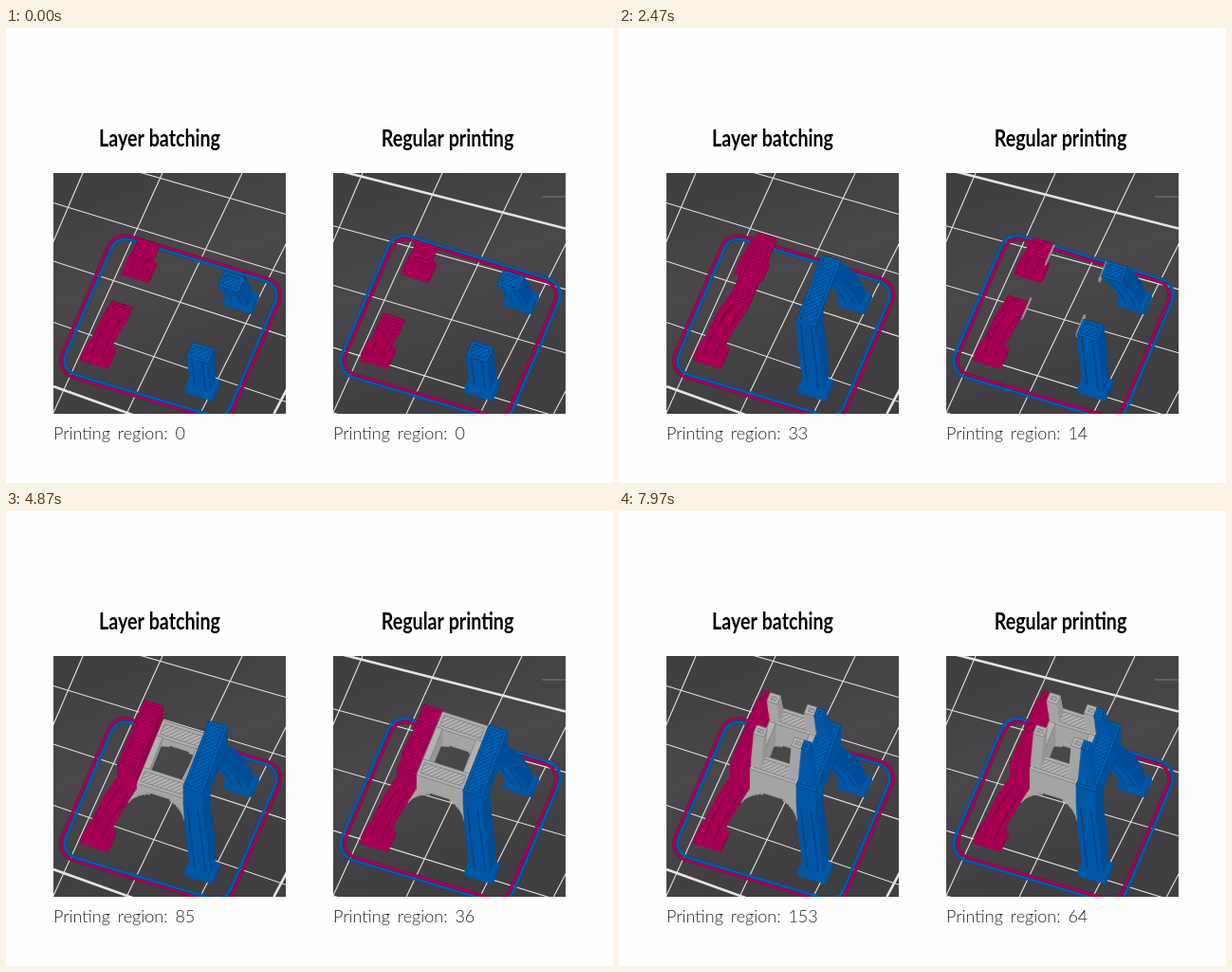
Write an HTML page with a canvas that moves like this. It is 640 px wide and 480 px high and loops after 8000 ms.

```html
<!DOCTYPE html>
<html lang="en">
<head>
<meta charset="utf-8">
<title>Layer batching and regular printing</title>
<style>
html, body { margin: 0; width: 100%; height: 100%; overflow: hidden; background: #fefefe; }
canvas { display: block; }
</style>
</head>
<body>
<canvas id="stage" width="640" height="480"></canvas>
<script>
const ctx = document.getElementById('stage').getContext('2d');
const LOOP = 8000, START = 970, STEP = 0.02, DECK = 1.27, PEAK = 1.61;
const BOX = [50, 153, 245, 254];

// top, front and right shade, infill line
const RED = ['#ae0059', '#a60053', '#8f0048', '#870045'];
const BLUE = ['#005fb0', '#0058a6', '#004c93', '#004384'];
const GRAY = ['#b2b2b2', '#a5a5a5', '#8d8d8d', '#7c7c7c'];

// outer corners: front left, front right, back right, back left
const BASE = [[78, 351], [218, 394], [267, 285], [130, 243]];
const ROOF = [[117, 340], [207, 369], [234, 299], [146, 271]];
const SKIRT = [[50, 363], [234, 418], [297, 270], [114, 214]];

const panels = [
  { shift: 0, title: 'Layer batching', mid: 162, rate: 0.02185, rings: [RED, BLUE],
    phase: 0, tilt: 0.36, boldAcross: 0, boldAlong: 4, heights: batched },
  { shift: 295, title: 'Regular printing', mid: 465.5, rate: 0.00912, rings: [BLUE, RED],
    phase: -0.4, tilt: 0.32, boldAcross: 4, boldAlong: -1, heights: regular }
];

const mix = (a, b, k) => a + (b - a) * k;
const mix2 = (a, b, k) => [mix(a[0], b[0], k), mix(a[1], b[1], k)];
const clamp = k => Math.max(0, Math.min(1, k));
const ramp = (x, a, b) => clamp((x - a) / (b - a));

// every material rises together
function regular(t) {
  const z = mix(0.55, PEAK, ramp(t, START, 7970) ** 0.85);
  return [z, z, z];
}

// in each batch the coloured sides rise first, then the middle catches up
function batched(t) {
  const ends = [START, 3900, 5900, 7900], levels = [0, 1.08, 1.3, PEAK];
  const rise = (first, from, to) => ends.slice(1).reduce((z, end, i) =>
    mix(z, levels[i + 1], ramp(ramp(t, ends[i], end), from, to)), first);
  return [rise(0.76, 0, 0.6), rise(0.8, 0.55, 0.9), rise(0.54, 0, 0.6)];
}

// u runs left to right, v front to back, both -1..1 on the tapering outline
function project(u, v, z) {
  const w = Math.min(z, 1) ** 1.6, k = (u + 1) / 2;
  const c = BASE.map((b, i) => mix2(b, ROOF[i], w));
  const [x, y] = mix2(mix2(c[0], c[1], k), mix2(c[3], c[2], k), (v + 1) / 2);
  return [x, y - 52 * Math.min(z, 1) - 75 * Math.max(0, z - 1)];
}

function trace(points, close = true) {
  ctx.beginPath();
  points.forEach(q => ctx.lineTo(...q));
  if (close) ctx.closePath();
}

function fill(points, color) {
  trace(points);
  ctx.fillStyle = color;
  ctx.fill();
}

function infill([a, b, c, d], color) {
  const at = (i, j) => mix2(mix2(a, b, i), mix2(d, c, i), j);
  const w = Math.hypot(b[0] - a[0], b[1] - a[1]), h = Math.hypot(d[0] - a[0], d[1] - a[1]);
  ctx.strokeStyle = color;
  ctx.lineWidth = 0.8;
  trace([a, b, c, d]);
  ctx.stroke();
  if (Math.min(w, h) < 8) return;
  const mx = 3 / w, my = 3 / h;
  trace([at(mx, my), at(1 - mx, my), at(1 - mx, 1 - my), at(mx, 1 - my)]);
  ctx.stroke();
  ctx.save();
  ctx.clip();
  ctx.beginPath();
  for (let s = -h; s < w; s += 5) {
    ctx.moveTo(...at(s / w, 0));
    ctx.lineTo(...at((s + h) / w, 1));
  }
  ctx.stroke();
  ctx.restore();
}

function slab([u0, u1, v0, v1], z, color, open) {
  const ring = h => [[u0, v0], [u1, v0], [u1, v1], [u0, v1]].map(q => project(...q, h));
  const low = ring(z), high = ring(z + STEP);
  const front = (a, b, shade) => fill([mix2(low[0], low[1], a), mix2(low[0], low[1], b),
    mix2(high[0], high[1], b), mix2(high[0], high[1], a)], shade);
  front(0, 1, color[1]);
  fill([low[1], low[2], high[2], high[1]], color[2]);
  fill(high, open ? color[0] : color[1]);
  if (open) infill(high, color[3]);
  // recessed panel along the legs
  if (color !== GRAY && z > 0.1 && z < 1) {
    front(0.2, 0.28, color[3]);
    front(0.72, 0.8, color[3]);
  }
}

// opening between the legs, 1 at the spring and 0 at the crown
const arch = (z, spring, n) => (1 - ramp(z, spring, 1) ** n) ** (1 / n);

function pillar(z) {
  const k = (z - DECK) / (PEAK - DECK);
  return { outer: 0.9 - 0.18 * k, near: 0.55 - 0.19 * k, far: 0.85 - 0.23 * k };
}

function sideParts(z, s) {
  const strip = (a, b, v0, v1) => s < 0 ? [-b, -a, v0, v1] : [a, b, v0, v1];
  const pair = (a, b, c, d) => [strip(a, b, c, d), strip(a, b, -d, -c)];
  if (z >= DECK) {
    const { outer, near, far } = pillar(z);
    return pair(0.55, outer, near, far);
  }
  if (z < 0.09) return pair(0.58, 1, 0.68, 1);
  const k = clamp(z), edge = mix(0.93, 1, k), inner = mix(0.65, 0.55, k);
  const gap = mix(0.72, 0.55, k) * arch(z, 0.6, 4);
  return gap > 0 ? pair(inner, edge, gap, edge) : [strip(inner, 1, -1, 1)];
}

function middleParts(z) {
  if (z < 0.8) return [];
  const corners = (a, b, c, d) => [[-b, -a, c, d], [a, b, c, d], [-b, -a, -d, -c], [a, b, -d, -c]];
  if (z >= DECK) {
    const { near, far } = pillar(z);
    return corners(0.32, 0.57, near, far);
  }
  const gap = 0.55 * arch(z, 0.78, 2);
  if (gap > 0) return corners(gap, 0.57, 0.45, 0.97);
  return [[-0.55, 0.55, 0.48, 0.96], [-0.55, -0.4, -0.5, 0.5],
          [0.4, 0.55, -0.5, 0.5], [-0.55, 0.55, -0.96, -0.48]];
}

function tower(heights) {
  const parts = [[RED, z => sideParts(z, -1)], [GRAY, middleParts], [BLUE, z => sideParts(z, 1)]];
  for (let z = 0; z < PEAK; z += STEP) {
    parts.forEach(([color, shape], i) => {
      if (z >= heights[i]) return;
      const open = z + STEP >= heights[i] || (z < DECK && z + STEP >= DECK);
      shape(z).forEach(r => slab(r, z, color, open));
    });
  }
}

function line(x0, y0, x1, y1, bold) {
  ctx.lineWidth = bold ? 2.6 : 1.1;
  trace([[x0, y0], [x1, y1]], false);
  ctx.stroke();
}

function bed(p) {
  const [x, y, w, h] = BOX;
  const g = ctx.createLinearGradient(x, y, x + 80, y + h);
  g.addColorStop(0, '#3f3e3f');
  g.addColorStop(0.5, '#494749');
  g.addColorStop(1, '#3f3e40');
  ctx.fillStyle = g;
  ctx.fillRect(...BOX);
  ctx.strokeStyle = '#e4e4e4';
  for (let i = 0; i < 5; i++) {
    const n = i + p.phase, y0 = 378 - 69 * n + 1.5 * n * n;
    line(x, y0, x + w, y0 + w * (p.tilt - 0.018 * n), i === p.boldAcross);
    const x0 = 81 + 84 * i;
    line(x0, y, x0 - h * (0.43 + 0.025 * i), y + h, i === p.boldAlong);
  }
  if (p.boldAcross) {
    ctx.strokeStyle = '#777';
    line(270, 178, 295, 178);
  }
}

function skirt(rings) {
  const mid = mix2(mix2(SKIRT[0], SKIRT[2], 0.5), mix2(SKIRT[1], SKIRT[3], 0.5), 0.5);
  rings.forEach((color, i) => {
    const c = SKIRT.map(q => mix2(mid, q, i ? 0.95 : 0.99));
    ctx.beginPath();
    ctx.moveTo(...mix2(c[3], c[0], 0.5));
    c.forEach((q, j) => ctx.arcTo(...q, ...c[(j + 1) % 4], 18 - 2 * i));
    ctx.closePath();
    ctx.strokeStyle = color[2];
    ctx.lineWidth = 3.4;
    ctx.stroke();
    ctx.strokeStyle = color[0];
    ctx.lineWidth = 1.8;
    ctx.stroke();
  });
}

function labels(p, t) {
  ctx.fillStyle = '#000';
  ctx.textAlign = 'center';
  ctx.font = 'bold 24px Lato, sans-serif';
  ctx.save();
  ctx.translate(p.mid, 125);
  ctx.scale(0.82, 1);
  ctx.fillText(p.title, 0, 0);
  ctx.restore();
  ctx.textAlign = 'left';
  ctx.fillStyle = '#222';
  ctx.font = '300 18px Lato, sans-serif';
  ctx.wordSpacing = '3px';
  const region = Math.round(Math.max(0, t - START) * p.rate);
  ctx.fillText('Printing region: ' + region, 50 + p.shift, 434);
  ctx.wordSpacing = '0px';
}

function draw(now) {
  const t = now % LOOP;
  ctx.fillStyle = '#fefefe';
  ctx.fillRect(0, 0, 640, 480);
  for (const p of panels) {
    ctx.save();
    ctx.translate(p.shift, 0);
    ctx.beginPath();
    ctx.rect(...BOX);
    ctx.clip();
    bed(p);
    skirt(p.rings);
    tower(p.heights(t));
    ctx.restore();
    labels(p, t);
  }
  requestAnimationFrame(draw);
}
requestAnimationFrame(draw);
</script>
</body>
</html>
```
